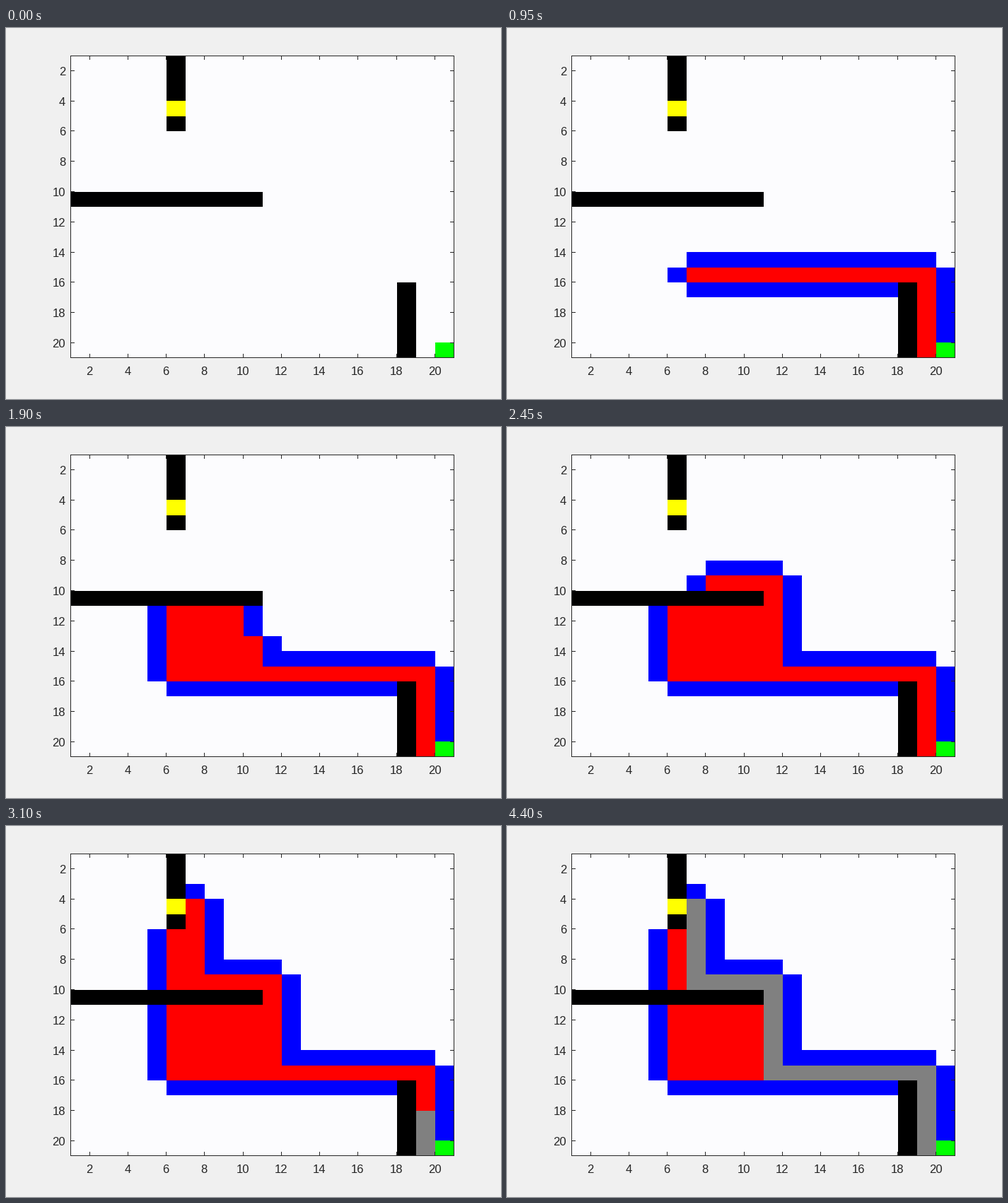
Write a matplotlib script that moves like this. It is 700 px wide and 525 px high and loops after 4450 ms.

```python
import matplotlib.pyplot as plt
import numpy as np
from matplotlib.animation import FuncAnimation
from matplotlib.colors import ListedColormap

W, H, DPI = 700, 525, 100
N = 20
START, GOAL = (20, 20), (6, 4)
WALLS = ({(6, y) for y in range(1, 6)} | {(x, 10) for x in range(1, 11)}
         | {(18, y) for y in range(16, 21)}) - {GOAL}

FREE, WALL, OPEN, CLOSED, PATH, BEGIN, END = range(7)
COLORS = ["#fcfcfe", "#000000", "#0000ff", "#ff0000",
          "#808080", "#00ff00", "#ffff00"]
BACK, INK = "#f0f0f0", "#262626"

# Plot box in pixels: origin and size of one grid unit
X0, Y0 = 91, 39
DX, DY = 27.125, 21.394
RIGHT, BOTTOM = 633, 466


def dist(c):
    return abs(c[0] - GOAL[0]) + abs(c[1] - GOAL[1])


def neighbours(c):
    for dx, dy in ((-1, 0), (0, -1), (1, 0), (0, 1)):
        n = (c[0] + dx, c[1] + dy)
        if 1 <= n[0] <= N and 1 <= n[1] <= N and n not in WALLS:
            yield n


def astar():
    """Return the cells in order of expansion and the path between the ends."""
    cost, parent = {START: 0}, {}
    frontier, order = {START}, []
    while True:
        cell = min(frontier, key=lambda c: (cost[c] + dist(c), dist(c), c[0]))
        if cell == GOAL:
            break
        frontier.remove(cell)
        order.append(cell)
        for n in neighbours(cell):
            if n not in order and cost[cell] + 1 < cost.get(n, 1e9):
                cost[n] = cost[cell] + 1
                parent[n] = cell
                frontier.add(n)
    path, cell = [], parent[GOAL]
    while cell != START:
        path.append(cell)
        cell = parent[cell]
    return order, path[::-1]


ORDER, ROUTE = astar()
FRAMES = 1 + len(ORDER) + len(ROUTE)


def board(step):
    grid = np.full((N, N), FREE)

    def paint(cells, state):
        for x, y in cells:
            grid[y - 1, x - 1] = state

    closed = ORDER[:step]
    paint(WALLS, WALL)
    for c in closed:
        paint(neighbours(c), OPEN)
    paint(closed, CLOSED)
    paint(ROUTE[:max(0, step - len(ORDER))], PATH)
    paint([START], BEGIN)
    paint([GOAL], END)
    return grid


fig = plt.figure(figsize=(W / DPI, H / DPI), dpi=DPI, facecolor=BACK)
ax = fig.add_axes([0, 0, 1, 1])
ax.axis("off")

k = np.arange(N + 1)
mesh = ax.pcolormesh(np.round(X0 + 0.5 + DX * k), np.round(Y0 + DY * k),
                     board(0), cmap=ListedColormap(COLORS),
                     vmin=-0.5, vmax=len(COLORS) - 0.5, antialiased=False)
ax.set_xlim(0, W)
ax.set_ylim(H, 0)


def line(x1, y1, x2, y2):
    # snapping moves whole coordinates to the pixel centre
    ax.plot([x1, x2], [y1, y2], color=INK, lw=72 / DPI, snap=True,
            solid_capstyle="projecting", antialiased=False)


for y in (Y0, BOTTOM):
    line(X0, y, RIGHT, y)
for x in (X0, RIGHT):
    line(x, Y0, x, BOTTOM)

TICK = 5
font = dict(family="Liberation Sans", size=12, color=INK, va="baseline")
for v in range(2, N + 1, 2):
    x, y = int(X0 + DX * (v - 1)), int(Y0 + DY * (v - 1))
    line(x, Y0, x, Y0 + TICK)
    line(x, BOTTOM - TICK, x, BOTTOM)
    line(X0, y, X0 + TICK, y)
    line(RIGHT - TICK, y, RIGHT, y)
    ax.text(x, 491, str(v), ha="center", **font)
    ax.text(84, y + 7, str(v), ha="right", **font)


def update(step):
    mesh.set_array(board(step))
    return [mesh]


anim = FuncAnimation(fig, update, frames=FRAMES, interval=50,
                     repeat=True, repeat_delay=0, blit=False)
plt.show()
```
